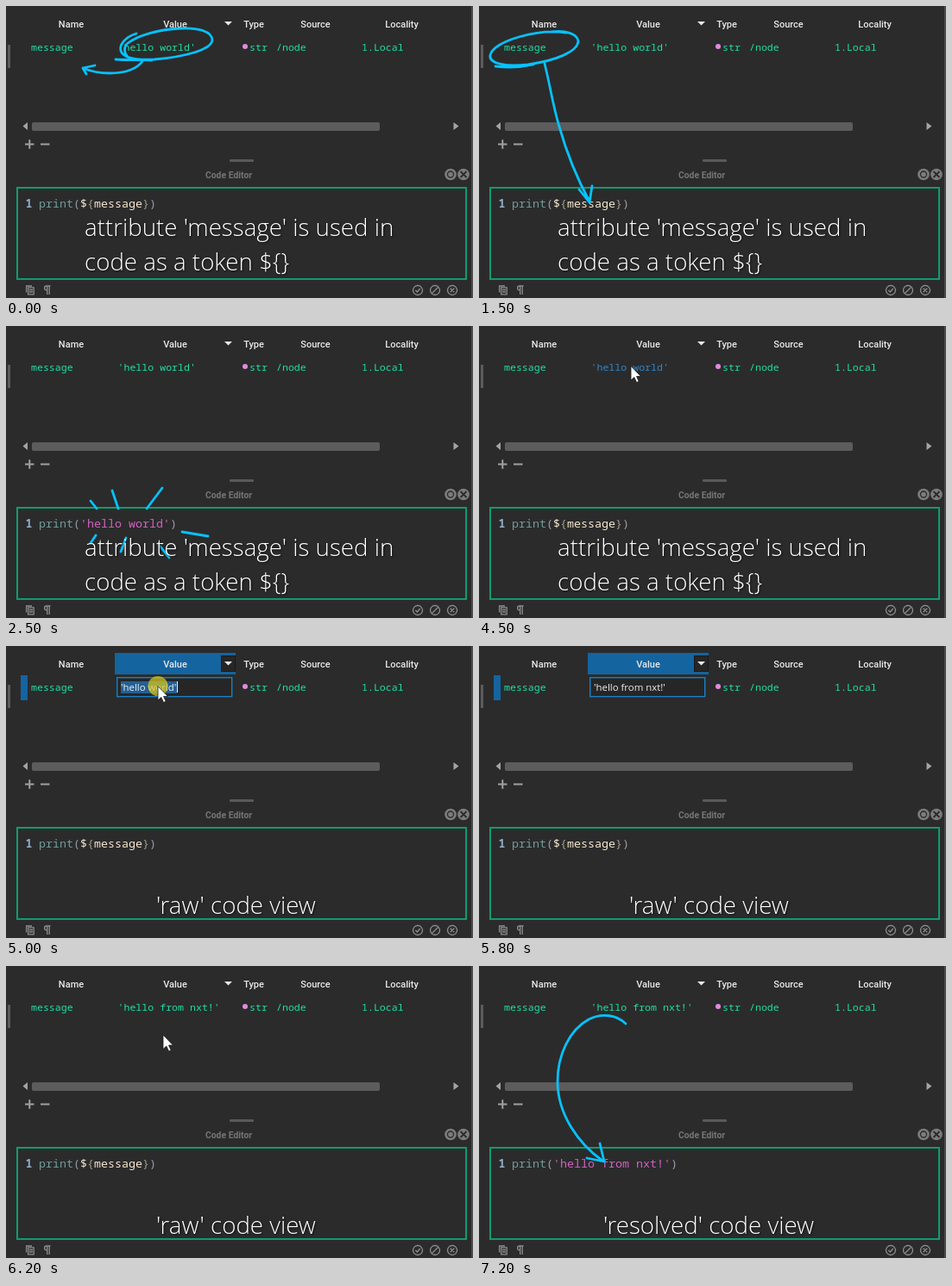
An HTML page for the animation above (8000 ms loop, 541 px wide and 339 px high).

```html
<!DOCTYPE html>
<html lang="en">
<head>
<meta charset="utf-8">
<title>Attribute tokens</title>
<style>
  html, body { margin: 0; height: 100%; overflow: hidden; background: #2b2b2b; }
  svg { display: block; width: 541px; height: 339px; }
  text { white-space: pre; }
  .head { font: 500 11px Roboto, sans-serif; fill: #e8e8e8; text-anchor: middle; }
  .cell { font: 500 11.6px "Noto Sans Mono", monospace; fill: #1fe0a6; }
  .hover { fill: #2f86cc; }
  .edit { font: 11.4px "Open Sans", sans-serif; fill: #f0f0f0; }
  .dock { font: 700 10.4px Roboto, sans-serif; fill: #757575; text-anchor: middle; }
  .code { font: 500 13.33px "Noto Sans Mono", monospace; fill: #9c9cac; }
  .fn { fill: #719c9c; }
  .tok { fill: #f6e8cf; }
  .brace { fill: #a59a88; }
  .str { fill: #d162c0; }
  .num { fill: #8fabc4; font-weight: 700; }
  .note { font: 300 27.7px "Open Sans", sans-serif; fill: #fff; text-shadow: 1px 1px 2px #111; }
  .ink { fill: none; stroke: #06c2ff; stroke-width: 2.8; stroke-linecap: round; stroke-linejoin: round; }
  .icon { fill: none; stroke: #8d8d8d; stroke-width: 1.3; }
</style>
</head>
<body>
<svg viewBox="0 0 541 339">
  <defs>
    <path id="pointer" d="M0 0V16.5L3.8 13L6.6 19L9.2 17.8L6.5 12H11.5Z" fill="#fff" stroke="#1a1a1a" stroke-width=".8"/>
  </defs>
  <rect width="541" height="339" fill="#2b2b2b"/>
  <rect x="539" width="2" height="339" fill="#4c4c4c"/>
  <rect x="2" y="45" width="3" height="27" fill="#5c5c5c"/>

  <g data-on="5000-6200">
    <rect x="126" y="8" width="140" height="25" fill="#1464a0"/>
    <rect x="249.500" y="11.500" width="16" height="18" fill="#262626" stroke="#1a1a1a"/>
    <rect x="17" y="34" width="8" height="29" fill="#1464a0"/>
    <rect x="128.700" y="36.700" width="133" height="22" fill="#262626" stroke="#1a7fc4" stroke-width="1.400"/>
  </g>

  <g class="head">
    <text x="75.500" y="25">Name</text>
    <text x="196" y="25">Value</text>
    <text x="287" y="25">Type</text>
    <text x="358.500" y="25">Source</text>
    <text x="458.500" y="25">Locality</text>
  </g>
  <path d="M253 18h9l-4.500 4.500z" fill="#e8e8e8"/>

  <g class="cell">
    <text x="29" y="52">message</text>
    <text x="282" y="52">str</text>
    <text x="313" y="52">/node</text>
    <text x="412" y="52">1.Local</text>
    <text x="129.500" y="52" data-on="0-4500">'hello world'</text>
    <text x="129.500" y="52" class="hover" data-on="4500-5000">'hello world'</text>
    <text x="129.500" y="52" data-on="6200-8000">'hello from nxt!'</text>
  </g>
  <circle cx="277" cy="47" r="3" fill="#e08be0"/>

  <g class="edit">
    <g data-on="5000-5400">
      <rect x="133" y="41" width="65" height="14" fill="#245f94"/>
      <text x="133" y="52">'hello world'</text>
      <path d="M198.500 41v13" stroke="#eee"/>
    </g>
    <text x="133" y="52" data-on="5400-5800">'hello from nxt</text>
    <text x="133" y="52" data-on="5800-6200">'hello from nxt!'</text>
  </g>

  <path d="M25 135v9l-5.500-4.500zM518.500 135v9l6-4.500z" fill="#a4a4a4"/>
  <rect x="30" y="135" width="403" height="10" rx="2" fill="#5c5c5c"/>
  <path d="M22 160.500h10.500M27.300 155.300v10.500M40 160.500h10.500" stroke="#a0a0a0" stroke-width="2"/>
  <rect x="259" y="178" width="28" height="3" rx="1" fill="#5a5a5a"/>
  <text class="dock" x="258" y="200">Code Editor</text>
  <g fill="#7c7c7c" stroke="#2b2b2b" stroke-width="1.300">
    <circle cx="515" cy="195.500" r="7.500"/>
    <circle cx="515" cy="195.500" r="3.500"/>
    <circle cx="530" cy="195.500" r="7.500"/>
    <path d="M526.500 192l7 7m0-7l-7 7" stroke-width="1.800"/>
  </g>

  <rect x="13" y="211" width="520" height="106" fill="none" stroke="#129a72" stroke-width="2"/>
  <g class="icon">
    <path d="M23.600 332.500v-7.500h6.500M25.700 326.900h6.500v8h-6.500zM27 329.500h4M27 332h4"/>
    <path d="M51.500 325h-4.500a2.400 2.400 0 0 0 0 4.800M47.700 325v10M50.200 325v10"/>
    <path d="M474.300 330l2 2l3.500-4M493.500 333.500l7-7M514.700 327.700l4.600 4.600m0-4.600l-4.600 4.600"/>
    <circle cx="477" cy="330" r="5.500"/>
    <circle cx="497" cy="330" r="5.500"/>
    <circle cx="517" cy="330" r="5.500"/>
  </g>

  <g class="code">
    <text x="22.500" y="234" class="num">1</text>
    <text x="38" y="234" data-on="0-2500 4500-7200"><tspan class="fn">print</tspan>(<tspan class="tok">$</tspan><tspan class="brace">{</tspan><tspan class="tok">message</tspan><tspan class="brace">}</tspan>)</text>
    <text x="38" y="234" data-on="2500-4500"><tspan class="fn">print</tspan>(<tspan class="str">'hello world'</tspan>)</text>
    <text x="38" y="234" data-on="7200-8000"><tspan class="fn">print</tspan>(<tspan class="str">'hello from nxt!'</tspan>)</text>
  </g>

  <g class="ink">
    <path data-on="0-1500" d="M151 32C138 36 131 45 133 52C136 61 152 63 172 62C207 59 237 51 239 40C239 29 222 25 202 26C178 27 152 34 140 44C136 49 137 55 141 59M127 62C141 63 155 62 169 63M159 63C152 73 138 78 120 78C106 78 96 75 89 72M103 69L89 72L93 79"/>
    <path data-on="1500-2500" d="M101 31C70 26 17 40 13 57C11 67 32 71 57 68C90 63 114 53 115 41C114 32 100 28 84 30M19 70C36 72 50 71 63 68M76 67C82 90 86 118 93 140C100 165 112 197 128 227M116 213L128 228L131 209"/>
    <path data-on="2500-4500" d="M98 203l7 9M123 191l7 21M181 188l-18 24M204 239l30 5M178 255l11 14M139 246l-6 16M104 243l-6 9"/>
    <path data-on="7200-8000" d="M170 67C160 57 143 54 127 62C105 74 91 103 91 134C91 172 115 206 143 226M125 223L145 227L140 206"/>
  </g>

  <g class="note">
    <g data-on="0-5000">
      <text x="91" y="267">attribute 'message' is used in</text>
      <text x="91" y="307">code as a token ${}</text>
    </g>
    <text x="174" y="311" data-on="5000-7200">'raw' code view</text>
    <text x="144" y="311" data-on="7200-8000">'resolved' code view</text>
  </g>

  <circle cx="176" cy="46.500" r="11.500" fill="#d8c81c" fill-opacity=".72" data-on="5000-5200"/>
  <use href="#pointer" x="176" y="46.500" data-on="4500-5400"/>
  <use href="#pointer" x="182" y="80" data-on="6200-7200"/>
</svg>
<script>
  const LOOP = 8000;
  const parts = [...document.querySelectorAll('[data-on]')].map(el => ({
    el,
    spans: el.dataset.on.split(' ').map(s => s.split('-').map(Number))
  }));

  function draw() {
    const t = performance.now() % LOOP;
    for (const { el, spans } of parts) {
      const on = spans.some(([a, b]) => t >= a && t < b);
      el.style.display = on ? '' : 'none';
    }
    requestAnimationFrame(draw);
  }
  draw();
</script>
</body>
</html>
```
